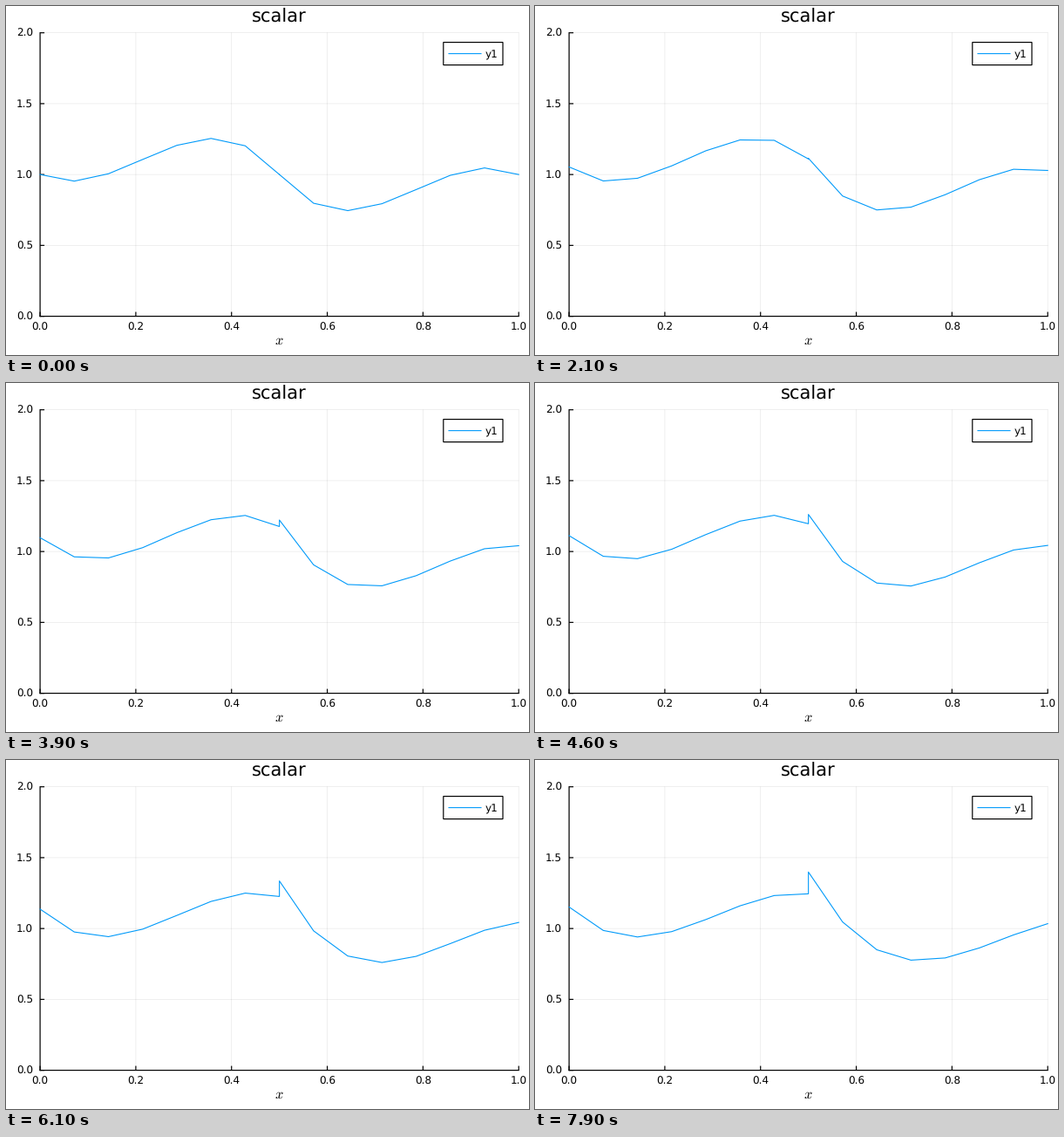
A matplotlib script for the animation above (8 s loop, 600x400 px).

```python
import numpy as np
import matplotlib.pyplot as plt
from matplotlib.animation import FuncAnimation
from matplotlib.patches import Rectangle

W, H, DPI = 600, 400, 100
FRAMES, INTERVAL = 80, 100
LEFT, RIGHT, TOP, BOTTOM = 39.1, 588.2, 30.7, 355.6
MID = 313
BLUE = "#009AFA"
PX = 72 / DPI  # points per pixel

plt.rcParams.update({
    "font.family": "DejaVu Sans",
    "mathtext.fontset": "cm",
    "text.hinting": "none",
    "path.snap": False,
})

# Burgers' equation: two periodic cubic DG elements on Lobatto nodes
nodes = np.array([-1, -np.sqrt(0.2), np.sqrt(0.2), 1])
powers = np.arange(4)
inv_vander = np.linalg.inv(nodes[:, None] ** powers)
diff = (powers * nodes[:, None] ** np.maximum(powers - 1, 0)) @ inv_vander
samples = np.linspace(-1, 1, 8)
interp = (samples[:, None] ** powers) @ inv_vander
SCALE, INV_WEIGHT = 4, 6
FRAME_DT, SUBSTEPS = 0.0013, 2


def flux(u):
    return u ** 2 / 2


def rhs(u):
    a, b = np.roll(u[:, -1], 1), u[:, 0]
    face = (flux(a) + flux(b)) / 2 - np.maximum(abs(a), abs(b)) * (b - a) / 2
    f = flux(u)
    d = f @ diff.T
    d[:, 0] -= INV_WEIGHT * (face - f[:, 0])
    d[:, -1] += INV_WEIGHT * (np.roll(face, -1) - f[:, -1])
    return -SCALE * d


def rk4(u, dt):
    k1 = rhs(u)
    k2 = rhs(u + dt / 2 * k1)
    k3 = rhs(u + dt / 2 * k2)
    k4 = rhs(u + dt * k3)
    return u + dt / 6 * (k1 + 2 * k2 + 2 * k3 + k4)


def solve():
    u = 1 + 0.255 * np.array([[0, 0, 1, 0], [0, -1, 0, 0]])
    states = []
    for _ in range(FRAMES):
        states.append((u @ interp.T).ravel())
        for _ in range(SUBSTEPS):
            u = rk4(u, FRAME_DT / SUBSTEPS)
    return states


def to_x(x):
    return LEFT + x * (RIGHT - LEFT)


def to_y(y):
    return BOTTOM - y / 2 * (BOTTOM - TOP)


fig = plt.figure(figsize=(W / DPI, H / DPI), dpi=DPI, facecolor="white")
ax = fig.add_axes([0, 0, 1, 1])
ax.set_xlim(0, W)
ax.set_ylim(H, 0)
ax.axis("off")


def stroke(xs, ys, color="black", width=1.2, **kw):
    return ax.plot(xs, ys, color=color, lw=width * PX, **kw)[0]


def label(x, y, text, size=12, ha="center"):
    ax.text(x, y, text, fontsize=size * PX, ha=ha, va="baseline", zorder=5)


x_ticks = [(to_x(v), f"{v:.1f}") for v in np.linspace(0, 1, 6)]
y_ticks = [(to_y(v), f"{v:.1f}") for v in np.linspace(0, 2, 5)]

for x, _ in x_ticks:
    stroke([x, x], [TOP, BOTTOM], width=0.6, alpha=0.1, zorder=1)
for y, _ in y_ticks:
    stroke([LEFT, RIGHT], [y, y], width=0.6, alpha=0.1, zorder=1)

stroke([LEFT, RIGHT], [BOTTOM, BOTTOM])
stroke([LEFT, LEFT], [TOP, BOTTOM])
for x, text in x_ticks:
    stroke([x, x], [BOTTOM, BOTTOM - 5], solid_capstyle="butt")
    label(x, 371.7, text)
for y, text in y_ticks:
    stroke([LEFT, LEFT + 5], [y, y], solid_capstyle="butt")
    label(31, y + 4.4, text, ha="right")

label(MID, 18.3, "scalar", 21)
label(MID, 388.3, "$x$", 16.5)

xs = to_x(np.concatenate([samples + 1, samples + 3]) / 4)
curves = [to_y(u) for u in solve()]
curve = stroke(xs, curves[0], BLUE, 1.1, zorder=3, solid_joinstyle="round")

ax.add_patch(Rectangle((501.8, 41.6), 68.2, 26, facecolor="white",
                       edgecolor="black", lw=1.2 * PX, zorder=4))
stroke([508, 545], [54.6, 54.6], BLUE, 1.1, zorder=5)
label(550, 59, "y1", ha="left")


def update(i):
    curve.set_ydata(curves[i])
    return (curve,)


anim = FuncAnimation(fig, update, frames=FRAMES, interval=INTERVAL,
                     repeat=True, repeat_delay=0)
plt.show()
```
